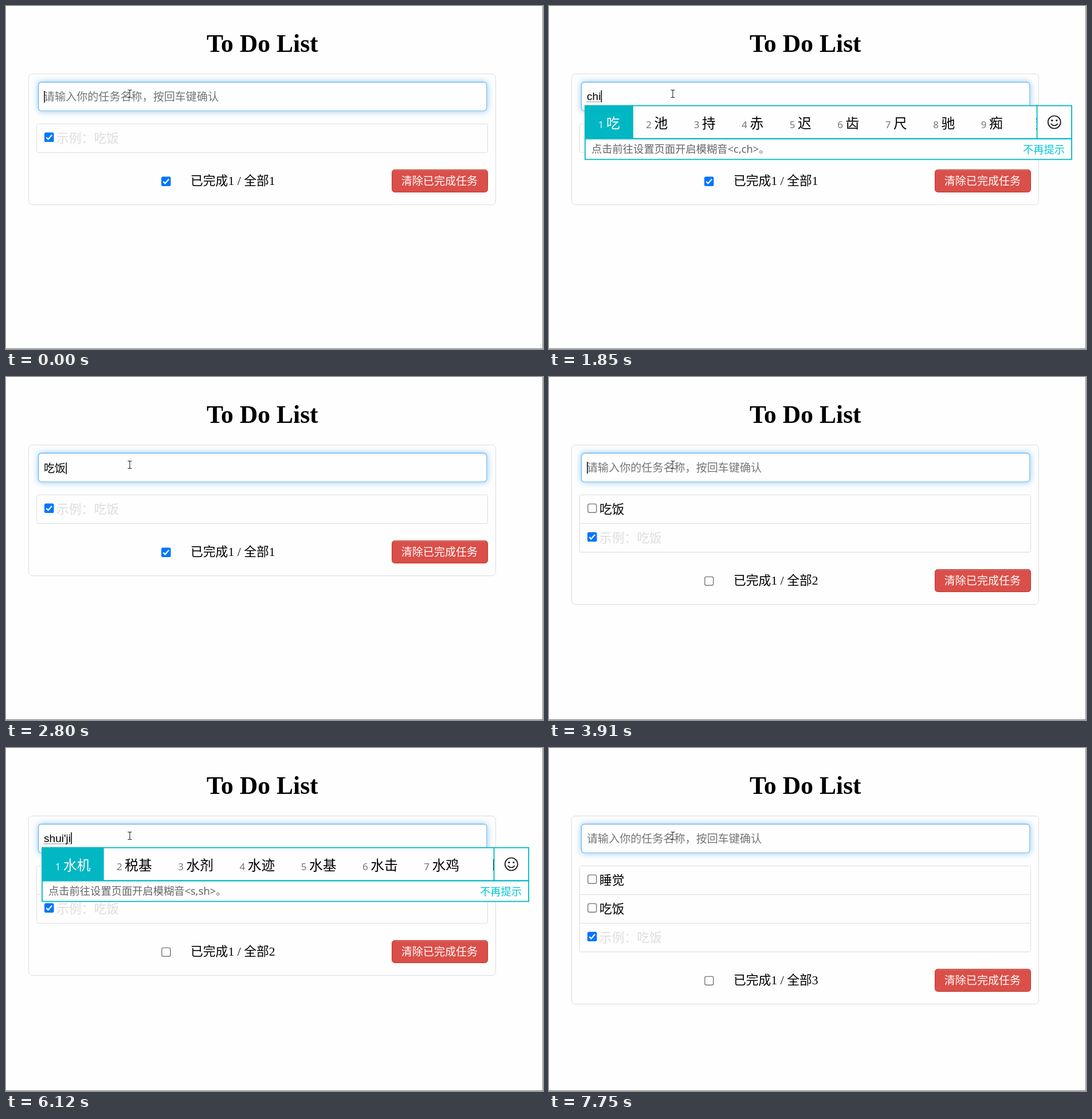
These frames come from a looping animation (937x598 px, 8 s). An HTML page:

```html
<!DOCTYPE html>
<html lang="zh-CN">
<head>
<meta charset="utf-8">
<title>To Do List</title>
<style>
  html, body { margin: 0; width: 100%; height: 100%; overflow: hidden; background: #fefefe; }
  #field {
    position: absolute; left: 56px; top: 132px; width: 783.5px; height: 51.5px;
    border-radius: 5.5px; background: #fefefe;
    box-shadow: 0 0 10.9px rgba(82,168,236,.6);
  }
  svg { position: absolute; left: 0; top: 0; }
  text { white-space: pre; }
  .page { font-family: "Liberation Serif", "Noto Sans CJK SC", "Noto Sans CJK", serif; }
  .input { font-family: "Liberation Sans", "Noto Sans CJK SC", "Noto Sans CJK", sans-serif; }
  .ime { font-family: "Noto Sans", "Noto Sans CJK SC", "Noto Sans CJK", sans-serif; }
</style>
</head>
<body>
<div id="field"></div>
<svg id="stage" width="937" height="598" viewBox="0 0 937 598"></svg>
<script>
const LOOP = 8000;
const TEAL = '#00b7c3';
const BODY_SIZE = 21.8;
const INPUT_SIZE = 19.07;
const stage = document.getElementById('stage');
const ruler = document.createElement('canvas').getContext('2d');
ruler.font = '100px "Liberation Sans", sans-serif';

const EXAMPLE = { label: '示例：吃饭', done: true };
const EAT = { label: '吃饭' };
const SLEEP = { label: '睡觉' };

const empty = caret => ({ text: '', caret });
const typed = (text, caret = true) => ({ text, caret });
// Words may be a string of single characters or a space separated list.
const compose = (text, words, extra) => ({
  text, caret: true, words: words.includes(' ') ? words.split(' ') : [...words], ...extra
});

const sleepWords = '睡觉 水饺 睡觉了 睡觉吧 睡觉啦 睡觉去 水浇 税交 水角';
const steps = [
  [0, empty(true)],
  [410, empty(false)],
  [560, typed('c')],
  [1120, empty(false)],
  [1570, compose('c', '才从次此错曾草')],
  [1700, compose('ch', '吃 出来 成为 吃饭 处理 传说 超过')],
  [1850, compose('chi', '吃池持赤迟齿尺驰痴翅', { hint: 'c,ch' })],
  [1980, compose("chi'f", '吃饭 吃法 吃粉 吃风 持否 迟发 赤粉 池')],
  [2120, compose("chi'fa", '吃法 吃发 持法 吃罚 迟发 池法 赤发 齿')],
  [2400, compose("chi'fan", '吃饭 吃饭了 吃饭吗 吃饭去 吃饭啦 吃饭吧 持饭 迟返 赤帆', { wide: true })],
  [2800, typed('吃饭')],
  [3230, empty(true)],
  [3370, empty(false)],
  [3910, empty(true)],
  [4460, empty(false)],
  [5040, empty(true)],
  [5450, compose('s', '是说上三时四十')],
  [5590, compose('sh', '是上时说事使手')],
  [5850, compose('shui', '水睡谁税说随岁碎虽遂', { hint: 's,sh' })],
  [5980, compose("shui'j", '睡觉 水晶 水饺 水井 税金 水军 水机 睡', { hint: 's,sh' })],
  [6120, compose("shui'ji", '水机 税基 水剂 水迹 水基 水击 水鸡 睡姬', { hint: 's,sh' })],
  [6270, compose("shui'jiao", sleepWords, { wide: true })],
  [6790, compose("shui'jiao", sleepWords, { wide: true, caret: false })],
  [7190, typed('睡觉')],
  [7470, empty(true)],
  [7750, empty(false)]
];

const itemsAt = time =>
  time < 3230 ? [EXAMPLE] : time < 7470 ? [EAT, EXAMPLE] : [SLEEP, EAT, EXAMPLE];

const rect = (x, y, w, h, fill, more = '') =>
  `<rect x="${x}" y="${y}" width="${w}" height="${h}" fill="${fill}" ${more}/>`;
const label = (kind, x, y, size, fill, str, more = '') =>
  `<text class="${kind}" x="${x}" y="${y}" font-size="${size}" fill="${fill}" ${more}>${
    str.replace(/</g, '&lt;')}</text>`;
const path = (d, color, width, more = '') =>
  `<path d="${d}" fill="none" stroke="${color}" stroke-width="${width}" ${more}/>`;

function checkbox(x, y, on) {
  return on
    ? rect(x, y, 16.5, 16.5, '#0075ff', 'rx="2.6"') +
      path(`M${x + 3.3} ${y + 8.5}l3.3 3.3 6.6-7.5`, '#fff', 2.2)
    : rect(x + .9, y + .9, 14.9, 14.9, '#fff', 'rx="2.6" stroke="#767676" stroke-width="1.4"');
}

function page(items) {
  const drop = 50 * (items.length - 1);
  const rows = items.map(({ label: name, done }, i) => {
    const y = 50 * i;
    return (i ? path(`M54 ${205.5 + y}H840`, '#ddd', 1) : '') +
      checkbox(67, 220.5 + y, done) +
      label('page', 88, 237.5 + y, BODY_SIZE, done ? '#ddd' : '#000', name);
  }).join('');
  const doneCount = items.filter(item => item.done).length;
  return label('page', 350, 79.5, 2 * BODY_SIZE, '#000', 'To Do List', 'font-weight="bold"') +
    rect(39.5, 118.5, 815, 228 + drop, 'none', 'rx="6.5" stroke="#ddd"') +
    rect(56.6, 132.7, 782.3, 50.2, 'none', 'rx="5" stroke="#75b9f0" stroke-width="1.36"') +
    rect(53.5, 205.5, 787, 50 + drop, 'none', 'rx="3" stroke="#ddd"') + rows +
    `<g transform="translate(0 ${drop})">` +
    checkbox(271, 297.5, doneCount === items.length) +
    label('page', 322, 312, BODY_SIZE, '#000', `已完成${doneCount} / 全部${items.length}`) +
    rect(673.5, 285.5, 167, 39, '#da4f49', 'rx="5" stroke="#bd362f"') +
    path('M678 286.6H836', '#e17b77', 1) +
    label('page', 689.7, 311.5, INPUT_SIZE, '#fff', '清除已完成任务') + '</g>' +
    path('M936.5 0V598', '#888', 1) + path('M0 597.5H937', '#777', 1);
}

function inputText({ text, caret, words }) {
  const latin = /^[\x20-\x7e]+$/.test(text);
  const width = latin ? ruler.measureText(text).width * INPUT_SIZE / 100 : text.length * INPUT_SIZE;
  const end = 66 + width;
  const top = latin ? 147 : text ? 149 : 148;
  return (text
    ? label('input', 66, latin ? 164 : 166, INPUT_SIZE, '#000', text)
    : label('input', 66, 164.5, INPUT_SIZE, '#757575', '请输入你的任务名称，按回车键确认')) +
    (words ? path(`M66 167H${end}`, '#222', 1, 'stroke-dasharray="1.4 1.4"') : '') +
    (caret ? rect(end + .3, top, 1.5, 20.5, '#000') : '');
}

function smiley(x) {
  const y = 202.5;
  return `<circle cx="${x}" cy="${y}" r="11" fill="none" stroke="#111" stroke-width="1.7"/>` +
    `<circle cx="${x - 4}" cy="${y - 3}" r="1.6"/><circle cx="${x + 4}" cy="${y - 3}" r="1.6"/>` +
    path(`M${x - 6} ${y + 2.6}Q${x} ${y + 9.4} ${x + 6} ${y + 2.6}`, '#111', 1.6);
}

function popup({ words, hint, wide }) {
  if (!words) return '';
  const limit = wide ? 2000 : 851.5;
  let x = 63.5, list = '';
  words.forEach((word, i) => {
    const width = 59.75 + 23.75 * word.length;
    const fits = x + width <= limit + 1;
    if (!i) list += rect(62, 173, x + width - 62, 59, TEAL);
    if (fits) list += label('ime', x + 22.3, 213, 17, i ? '#777' : '#d9f4f6', String(i + 1));
    list += label('ime', x + (fits ? 36.5 : 34), 213.3, 23.75, i ? '#000' : '#fff', word);
    x += width;
  });
  const divider = Math.min(x, limit);
  const right = divider + 61;
  const frame = (y, h) => rect(63, y, right - 63.5, h, 'none', `stroke="${TEAL}" stroke-width="1.8"`);
  const tip = hint
    ? rect(62, 231, right - 62, 37, '#fefefe') + frame(231.5, 36) +
      label('ime', 74, 256, 18.3, '#666', `点击前往设置页面开启模糊音<${hint}>。`) +
      label('ime', 827, 257, 18.3, '#00c8d4', '不再提示')
    : '';
  return rect(62, 173, right - 62, 59, '#fefefe') + list +
    rect(divider, 173, 61, 59, '#fefefe') + tip + frame(173.7, 57.6) +
    path(`M${divider} 173V232`, TEAL, 1.8) + smiley(right - 30.8);
}

const pointer = path('M212.5 146.5H215L216 147.5L217 146.5H219.5M216 147V159' +
  'M212.5 159.5H215L216 158.5L217 159.5H219.5', '#222', 1.1);

let shown = -1;
function draw(now) {
  const time = now % LOOP;
  const index = steps.findLastIndex(([start]) => start <= time);
  if (index !== shown) {
    shown = index;
    const [start, state] = steps[index];
    stage.innerHTML = page(itemsAt(start)) + inputText(state) + popup(state) + pointer;
  }
}

let origin;
function tick(now) {
  origin ??= now;
  draw(Math.max(0, now - origin));
  requestAnimationFrame(tick);
}
draw(0);
requestAnimationFrame(tick);
</script>
</body>
</html>
```
